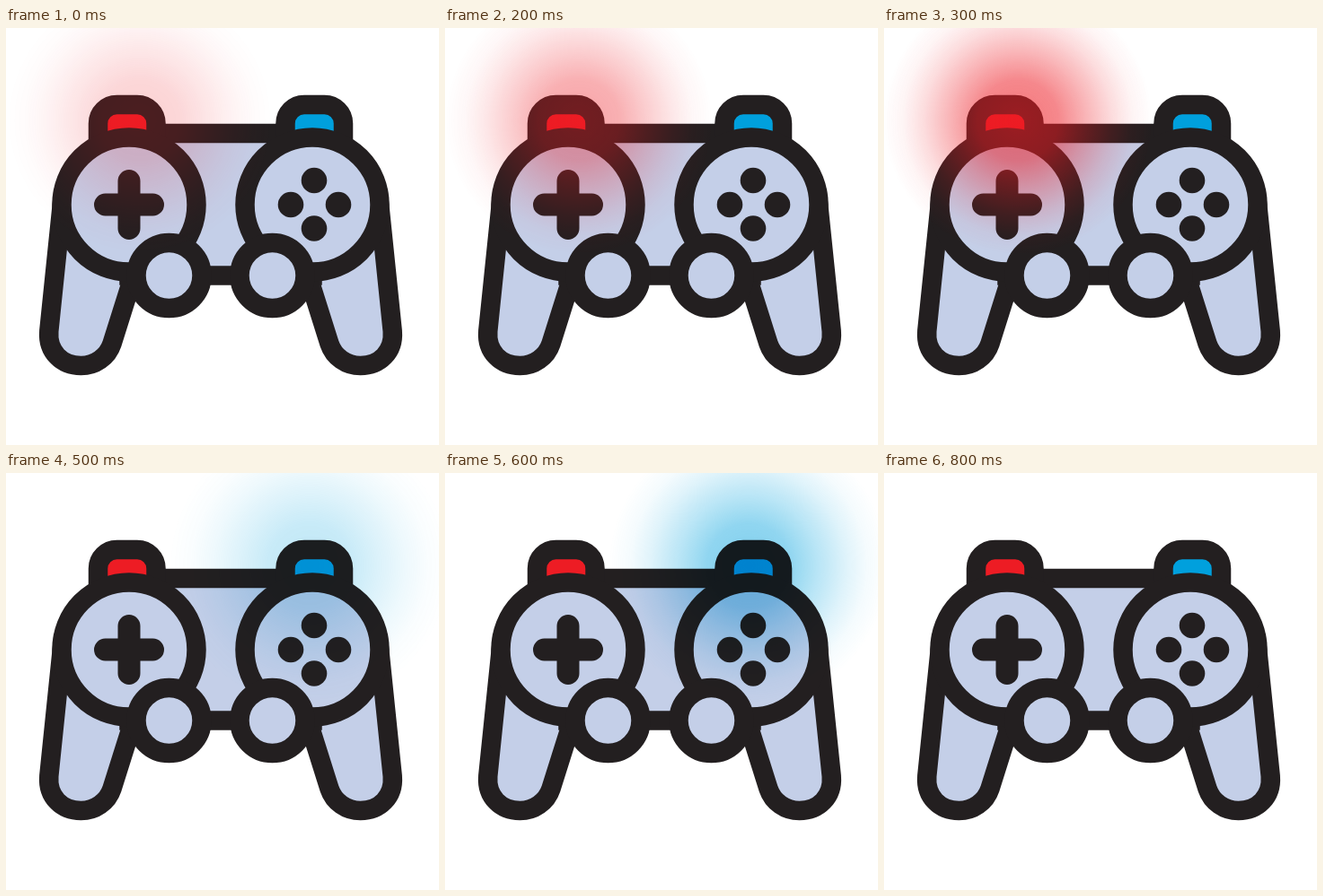
Animation of 482 by 465 pixels, one loop 0.9 s. Source, as an HTML page:

```html
<!DOCTYPE html>
<html lang="en">
<head>
<meta charset="utf-8">
<title>Game controller</title>
<style>
  html, body { margin: 0; width: 100%; height: 100%; overflow: hidden; background: #fff; }
  svg { display: block; width: 482px; height: 465px; isolation: isolate; }
  .line { stroke: #231f20; stroke-width: 21.5; }
  .shell { fill: #c4cfe8; }
  .ink { fill: #231f20; }
  .glow { opacity: 0; }
  #blueGlow { mix-blend-mode: multiply; }
</style>
</head>
<body>
<svg viewBox="0 0 482 465">
  <defs>
    <radialGradient id="redLight"></radialGradient>
    <radialGradient id="blueLight"></radialGradient>
    <path id="trigger" class="line" d="M102.5 140V106.5A21 21 0 0 1 123.5 85.5H146A21 21 0 0 1 167 106.5V140Z"/>
    <g id="half" class="line shell">
      <path d="M63 190L47.8 338C46 361 62 376.5 83.500 376.500C99 376.500 113 367 118 352L140 282V190Z"/>
    </g>
    <g id="rounds" class="line shell">
      <circle cx="137" cy="197" r="75"/>
      <circle cx="181.500" cy="276" r="36.500"/>
    </g>
  </defs>
  <rect width="482" height="465" fill="#fff"/>
  <use href="#half"/>
  <use href="#half" transform="translate(478) scale(-1 1)"/>
  <rect class="line shell" x="137" y="117.500" width="204" height="158.500"/>
  <use href="#trigger" fill="#ed1c24"/>
  <use href="#trigger" fill="#00a0dd" transform="translate(478) scale(-1 1)"/>
  <use href="#rounds"/>
  <use href="#rounds" transform="translate(478) scale(-1 1)"/>
  <path d="M110.500 197H163.500M137 170.500V223.500" stroke="#231f20" stroke-width="25" stroke-linecap="round"/>
  <g class="ink">
    <circle cx="343" cy="170" r="14.300"/>
    <circle cx="317" cy="197" r="14.300"/>
    <circle cx="370" cy="197" r="14.300"/>
    <circle cx="343" cy="223.500" r="14.300"/>
  </g>
  <circle id="redGlow" class="glow" cx="149" cy="103" r="150" fill="url(#redLight)"/>
  <circle id="blueGlow" class="glow" cx="338" cy="103" r="155" fill="url(#blueLight)"/>
</svg>
<script>
  const STEP = 100, COUNT = 9;
  const falloff = [[0, 1], [.3, .87], [.5, .55], [.7, .25], [.85, .08], [1, 0]];

  function fillGradient(id, color) {
    const gradient = document.getElementById(id);
    for (const [offset, alpha] of falloff) {
      const stop = document.createElementNS('http://www.w3.org/2000/svg', 'stop');
      stop.setAttribute('offset', offset);
      stop.setAttribute('stop-color', color);
      stop.setAttribute('stop-opacity', alpha);
      gradient.append(stop);
    }
  }

  // One opacity per step, held until the next step.
  function pulse(id, levels) {
    const frames = levels.map((opacity, i) => ({ opacity, offset: i / COUNT, easing: 'step-end' }));
    frames.push({ opacity: 0, offset: 1 });
    const animation = document.getElementById(id).animate(frames, { duration: STEP * COUNT, iterations: Infinity });
    animation.startTime = 0;
  }

  fillGradient('redLight', '#ed1c24');
  fillGradient('blueLight', '#00a0dd');
  pulse('redGlow', [0, .2, .4, .6, 0, 0, 0, 0, 0]);
  pulse('blueGlow', [0, 0, 0, 0, 0, .25, .5, .72, 0]);
</script>
</body>
</html>
```
